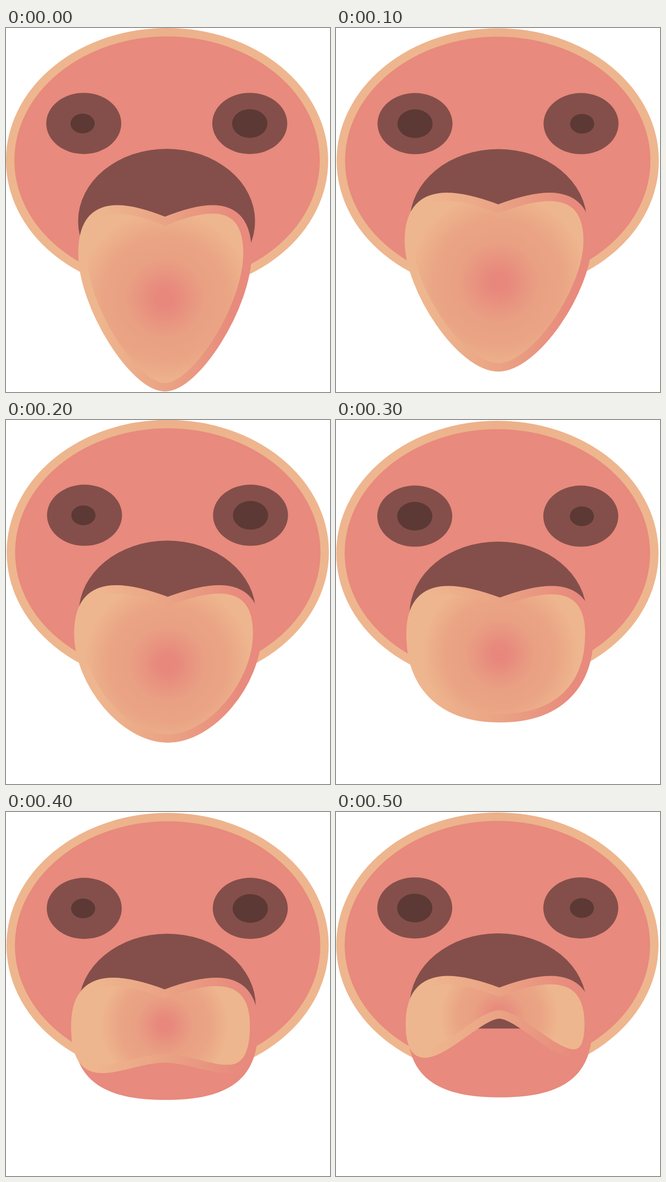
Animation of 636 by 714 pixels, one loop 0.6 s. Source, as an HTML page with a canvas:

```html
<!DOCTYPE html>
<html lang="en">
<head>
<meta charset="utf-8">
<title>Tongue</title>
<style>
  html, body { margin: 0; width: 100%; height: 100%; overflow: hidden; background: #fff; }
  canvas { display: block; }
</style>
</head>
<body>
<canvas id="stage" width="636" height="714"></canvas>
<script>
const ctx = document.getElementById('stage').getContext('2d');
const PINK = '#e88a7d', MID = '#eaa384', PEACH = '#eeb68e';
const BROWN = '#844f4a', DARK = '#5c3935';
const LINE = 16.5, STEP = 100;

// head: head x shift, eyes: eye x shift, dy: common y shift, mouth: mouth centre x
// tongue: cx, half width, notch y, tip y, side handle length, tip handle length
// under: underside cx, bottom y
const poses = [
  { head: 0,   eyes: 0,   dy: 0,    mouth: 315.2, tongue: [312, 162, 379, 704.7, 103, 61] },
  { head: 1.3, eyes: 2.5, dy: 0.4,  mouth: 318.6, tongue: [318.5, 175.5, 354.7, 665.7, 95, 73] },
  { head: 1.4, eyes: 1.5, dy: -0.4, mouth: 316.6, tongue: [317.5, 175.5, 355.5, 624.7, 97, 86] },
  { head: 0.6, eyes: 2,   dy: 1.4,  mouth: 318.1, tongue: [321.8, 175.5, 357, 585, 102, 114] },
  { head: 1,   eyes: 1,   dy: 1.8,  mouth: 316.5, tongue: [311.5, 175.5, 356.6, 483.4, 140, 80], under: [313, 564.7] },
  { head: 0.6, eyes: 2,   dy: 1,    mouth: 318.3, tongue: [320.5, 175.5, 353.2, 397, 140, 50], under: [321.5, 559.7] }
];

function ellipse(x, y, rx, ry, fill) {
  ctx.beginPath();
  ctx.ellipse(x, y, rx, ry, 0, 0, Math.PI * 2);
  ctx.fillStyle = fill;
  ctx.fill();
}

function withStops(grad, stops) {
  for (const [at, color] of stops) grad.addColorStop(at, color);
  return grad;
}

function drawHead(p) {
  const x = 316.2 + p.head, y = 259.8 + p.dy;
  ellipse(x, y, 308, 251.5, PINK);
  ctx.strokeStyle = withStops(ctx.createLinearGradient(x - 316, 0, x + 316, 0),
    [[0, PEACH], [0.25, PEACH], [0.5, '#ecb08a'], [0.75, PEACH], [1, PEACH]]);
  ctx.stroke();
}

function drawEyes(p, swap) {
  const y = 187.2 + p.dy;
  [152.6, 478.5].forEach((base, i) => {
    const x = base + p.eyes, small = (i === 1) === swap;
    ellipse(x, y, 73.6, 60, BROWN);
    if (small) ellipse(x + (i ? 2.2 : -2.2), y + 0.2, 23.7, 19.4, DARK);
    else ellipse(x, y + 0.2, 34.6, 28.2, DARK);
  });
}

function drawUnder([cx, bottom]) {
  const w = 181, top = bottom - 135, side = bottom - 25;
  ctx.beginPath();
  ctx.moveTo(cx - w, top);
  ctx.bezierCurveTo(cx - w, side, cx - 100, bottom, cx, bottom);
  ctx.bezierCurveTo(cx + 100, bottom, cx + w, side, cx + w, top);
  ctx.closePath();
  ctx.fillStyle = PINK;
  ctx.fill();
}

function drawTongue([cx, w, notch, tip, drop, round]) {
  const side = notch + 63, crown = 0.455 * w;
  ctx.beginPath();
  ctx.moveTo(cx, notch);
  ctx.bezierCurveTo(cx - crown, notch - 30, cx - w, notch - 50, cx - w, side);
  ctx.bezierCurveTo(cx - w, side + drop, cx - round, tip, cx, tip);
  ctx.bezierCurveTo(cx + round, tip, cx + w, side + drop, cx + w, side);
  ctx.bezierCurveTo(cx + w, notch - 50, cx + crown, notch - 30, cx, notch);
  ctx.closePath();

  // lobes hang below the tip when it curls up
  const top = notch - 23.3;
  const low = tip > 500 ? tip : Math.max(tip + 20, notch + 121);
  const bottom = tip > 450 ? Math.max(tip, Math.min(low, 503.5)) : low;
  const end = tip > 550 ? tip : bottom;
  const cy = (top + end) / 2, r = Math.sqrt(2 * w * (end - top)) / 2 * 1.03;
  ctx.fillStyle = withStops(ctx.createRadialGradient(cx, cy, 0, cx, cy, r),
    [[0, '#e8867c'], [0.1, '#e8887d'], [0.45, '#e9a083'], [0.72, '#eaa585'], [1, PEACH]]);
  ctx.fill();
  ctx.strokeStyle = withStops(ctx.createLinearGradient(cx - w, 0, cx + w, 0),
    [[0, PEACH], [0.1, PEACH], [0.5, MID], [0.92, PINK], [1, PINK]]);
  ctx.stroke();
}

function draw(now) {
  const i = Math.floor(now / STEP) % poses.length, p = poses[i];
  ctx.fillStyle = '#fff';
  ctx.fillRect(0, 0, 636, 714);
  ctx.lineWidth = LINE;
  drawHead(p);
  drawEyes(p, i % 2 === 1);
  ellipse(p.mouth, 379 + p.dy, 173.7, 142, BROWN);
  if (p.under) drawUnder(p.under);
  drawTongue(p.tongue);
}

const start = performance.now();
function tick() {
  draw(performance.now() - start);
  requestAnimationFrame(tick);
}
tick();
</script>
</body>
</html>
```
